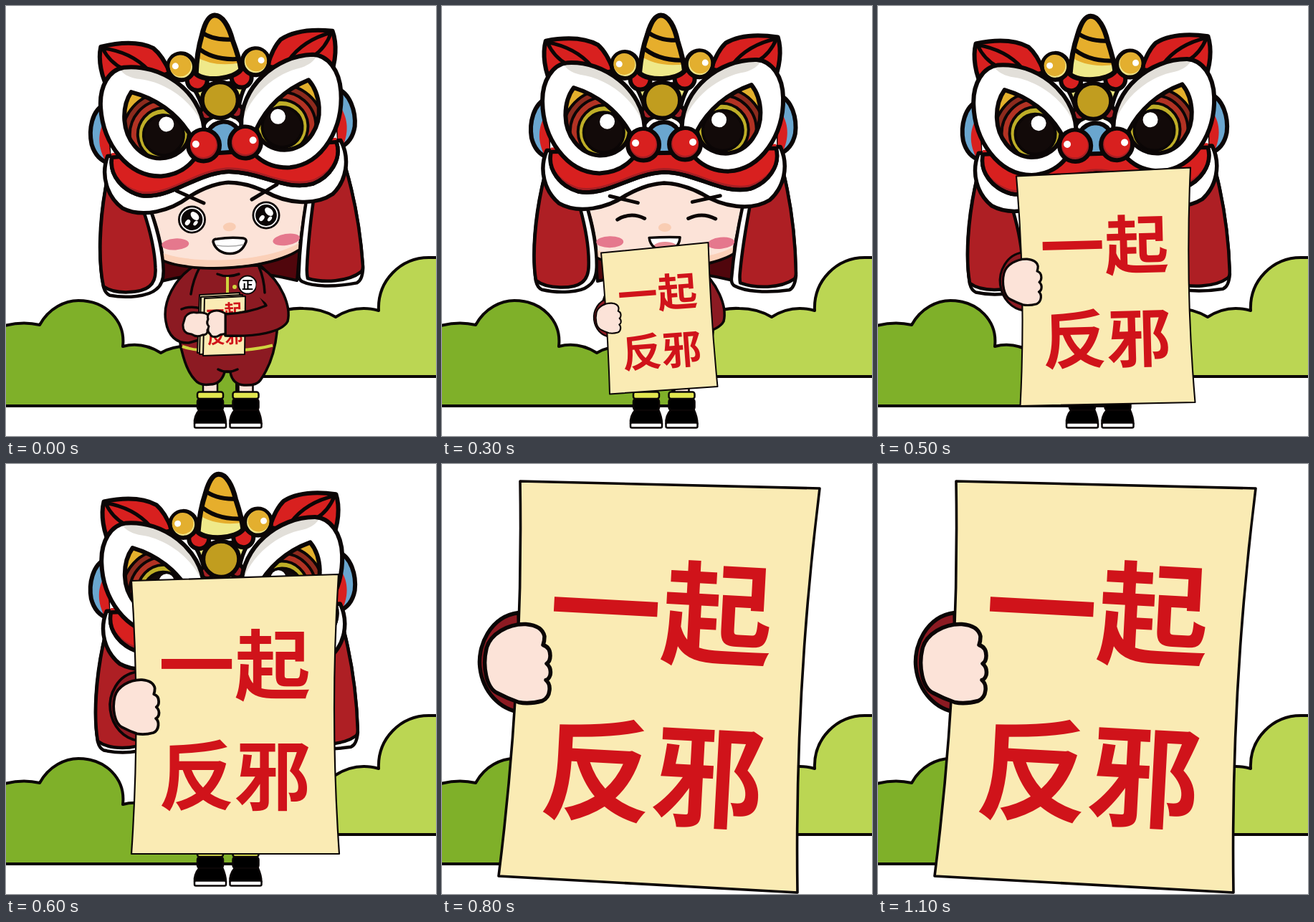
These frames come from a looping animation (600 by 600 pixels, 1300 ms). An HTML page:

```html
<!DOCTYPE html>
<html lang="zh">
<head>
<meta charset="utf-8">
<style>
html, body { margin: 0; width: 100%; height: 100%; overflow: hidden; background: #fff; }
svg { display: block; width: 100vw; height: 100vh; }
text { font-family: "Noto Sans CJK SC", "Noto Sans CJK", sans-serif; font-weight: 700; text-anchor: middle; }
</style>
</head>
<body>
<svg viewBox="0 0 600 600" stroke-linejoin="round" stroke-linecap="round">
  <defs>
    <clipPath id="socketClip"><path d="M191,111C225,122 252,145 268,174C266,195 245,207 225,206C195,203 179,175 179,150C179,133 184,120 191,111Z"/></clipPath>
    <clipPath id="smileClip"><path d="M293,322Q315,319 336,322C335,335 326,341 315,341C303,341 294,333 293,322Z"/></clipPath>
    <clipPath id="hornClip"><path id="horn" d="M314,12C325,12 333,28 337,48Q345,75 346,90C335,103 295,104 283,92Q286,62 295,38Q303,12 314,12Z"/></clipPath>
    <path id="band" d="M158,200C152,225 170,248 195,256C235,264 270,232 315,231C360,232 395,264 435,256C460,248 478,225 472,200Z"/>
    <g id="words" fill="#d0131a" font-size="100"><text y="-34.5">一起</text><text y="110.5">反邪</text></g>

    <g id="foot" stroke="#0b0606" stroke-width="2.5">
      <rect x="275" y="522" width="20" height="20" fill="#fce3d8"/>
      <path d="M270,563H302Q307,574 307,583H263Q262,572 270,563Z"/>
      <rect x="267" y="548" width="36" height="16" rx="4"/>
      <rect x="267" y="538.5" width="36" height="9.5" rx="3" fill="#e3e650"/>
      <rect x="263" y="581.5" width="44" height="7" rx="2" fill="#fff"/>
    </g>

    <g id="backHalf" stroke="#0b0606" stroke-width="6">
      <path fill="#6aa6cf" d="M154,125C134,132 128,160 131,180Q136,202 154,208Z"/>
      <path fill="#d8201f" stroke="none" d="M154,145C141,160 138,182 148,203L156,200Z"/>
      <path fill="#d8201f" d="M153,45Q200,37 226,52Q238,63 247,88L162,110C150,88 148,62 153,45Z"/>
      <path fill="none" stroke-width="5" d="M155,47Q164,68 182,78M155,47Q195,55 217,82"/>
    </g>

    <g id="frontHalf" stroke="#0b0606" stroke-width="6">
      <circle cx="284" cy="101" r="14" fill="#d8201f"/>
      <path fill="#fff" stroke="none" d="M183,76C235,74 287,115 289,168C286,205 262,230 225,231C178,229 147,180 147,130C147,100 162,78 183,76Z"/>
      <path fill="#e2dfd9" stroke="none" d="M177,77C235,70 288,115 289,168C275,125 235,98 200,93Q182,88 177,77Z"/>
      <path fill="none" d="M183,76C235,74 287,115 289,168C286,205 262,230 225,231C178,229 147,180 147,130C147,100 162,78 183,76Z"/>
      <g clip-path="url(#socketClip)" stroke-width="4">
        <rect x="175" y="105" width="100" height="110" fill="#e3b02c"/>
        <circle cx="233" cy="173" r="58" fill="#8c2a1d"/>
        <circle cx="233" cy="173" r="48" fill="#b23223"/>
        <circle cx="233" cy="173" r="37" fill="#beae27"/>
        <circle cx="232" cy="174" r="28" fill="#120a09"/>
      </g>
      <path fill="none" d="M191,111C225,122 252,145 268,174C266,195 245,207 225,206C195,203 179,175 179,150C179,133 184,120 191,111Z"/>
      <circle cx="237" cy="159" r="10.5" fill="#fff" stroke="none"/>
      <circle cx="263" cy="80.5" r="18.5" fill="#f0e68a"/>
      <circle cx="262" cy="79" r="15" fill="#e3af2f" stroke="none"/>
      <circle cx="255" cy="79" r="4.5" fill="#fff" stroke="none"/>
    </g>

    <g id="noseHalf">
      <circle cx="287" cy="192" r="22" fill="#a51f24" stroke="#0b0606" stroke-width="6"/>
      <circle cx="286.5" cy="190.5" r="18" fill="#d8201f"/>
      <circle cx="276" cy="189.5" r="5" fill="#fff"/>
    </g>

    <g id="openEye">
      <circle r="19.5" fill="#0b0606"/>
      <circle r="15.8" fill="none" stroke="#fff" stroke-width="1.8"/>
      <g fill="#fff">
        <ellipse cx="4" cy="-5" rx="4.5" ry="7" transform="rotate(-45 4 -5)"/>
        <ellipse cx="-6" cy="4" rx="3" ry="4.5" transform="rotate(40 -6 4)"/>
        <ellipse cx="5" cy="5" rx="2.3" ry="4" transform="rotate(40 5 5)"/>
      </g>
    </g>
  </defs>

  <g stroke="#0b0606" stroke-width="4">
    <path fill="#7fb029" d="M-5,447Q22,439 47,445C60,421 83,411 101,411C140,411 167,440 163,475Q190,468 216,484Q245,466 322,480V558H-5Z"/>
    <path fill="#bbd653" d="M350,517V450Q375,420 415,422Q440,422 460,434Q488,416 520,425C518,383 551,351 590,351H606V517Z"/>
  </g>

  <g id="hero">
    <use href="#foot"/>
    <use href="#foot" x="49.5"/>

    <path id="hood" fill="#50060c" stroke="#0b0606" stroke-width="4" d="M212,320L217,384Q315,360 406,383L411,325Z"/>

    <g stroke="#0b0606" stroke-width="3.5" fill="#8c1a22">
      <path d="M262,365C240,385 240,470 245,480Q252,510 264,522Q270,530 285,528Q300,528 305,511Q309,509 313,511Q316,528 332,529Q350,530 355,522Q374,495 378,455L380,400Q375,380 355,362Z"/>
      <path fill="none" d="M296,507Q309,514 323,507"/>
      <path fill="none" stroke="#cfd43f" stroke-width="4" stroke-linecap="butt" d="M246,475Q257,479 270,480M332,480Q355,478 372,473.500"/>
      <path d="M262,363C236,380 218,412 223,440C226,460 238,471 255,470L282,462L270,420L263,402Z" stroke="none"/>
      <path fill="none" d="M262,363C236,380 218,412 223,440C226,460 238,471 255,470L280,463M270,365Q261,382 258,402M245,423Q257,418 272,422"/>
      <path fill="none" d="M295,374Q309,380 325,374"/>
      <path fill="none" stroke="#cfd43f" stroke-width="4" stroke-linecap="butt" d="M309,378V400"/>
      <circle cx="319" cy="392" r="3" fill="#cfd43f" stroke="none"/>
      <circle cx="337" cy="389" r="12.5" fill="#fff" stroke-width="2"/>
    </g>
    <text x="337" y="395" font-size="16" style="font-weight:900">正</text>

    <g id="booklet" stroke="#0b0606" stroke-width="2" fill="#faebb4">
      <path d="M270,403L326,400L328,480L267,484Z"/>
      <path d="M272,406L330,403L332,483L270,486Z"/>
      <path d="M277,408L334,405L333,486L275,488Z"/>
      <use href="#words" stroke="none" transform="translate(305 443) rotate(-2) scale(.25)"/>
      <path fill="#fce3d8" stroke-width="3" d="M250,434Q255,426 266,428Q280,427 283,433Q286,439 283,443Q286,449 281,452Q282,459 274,459Q266,463 259,458Q246,457 247,444Z"/>
    </g>
    <path fill="#8c1a22" stroke="#0b0606" stroke-width="3.5" d="M357,365C385,385 398,420 393,440C385,455 350,462 306,460V430Q340,428 363,418L352,400Z"/>
    <path fill="#8c1a22" d="M352,364L361,371L365,416L348,402Z"/>
    <path fill="none" stroke="#0b0606" stroke-width="3.5" d="M353,364Q360,380 361,400"/>
    <path id="rightHand" fill="#fce3d8" stroke="#0b0606" stroke-width="3" d="M306,429Q295,422 286,427Q280,430 282,437Q279,443 283,447Q280,454 285,458Q287,463 295,461Q301,457 306,458Z"/>

    <g id="head">
      <g stroke="#0b0606" stroke-width="4.5">
        <path fill="#fce3d8" d="M207,278C214,300 219,330 219,348C255,368 365,373 410,346L425,278L315,240Z"/>
        <path fill="#fbd0b8" stroke="none" d="M220,338C265,358 365,360 410,337L409,345C365,370 258,367 220,347Z"/>
        <path fill="#fff" d="M148,235C133,290 129,345 134,380Q136,389 142,392C165,398 196,397 207,388Q218,381 219,362C220,335 215,308 207,278Z"/>
        <path fill="#ae1f24" d="M148,235C134,290 129,345 134,379C150,392 186,392 198,383Q208,376 208,358C209,330 204,305 197,278Z"/>
        <path fill="#fff" d="M482,235C492,280 497,330 497,378Q495,395 487,398C455,402 425,399 411,391Q406,388 407,380C410,350 417,310 425,276Z"/>
        <path fill="#ae1f24" d="M482,235C492,280 497,330 497,374Q497,381 494,383C475,396 440,395 419,387Q418,380 419,372C422,345 428,310 435,276Z"/>
      </g>
      <ellipse cx="315" cy="308" rx="9" ry="6" fill="#f9cdb3"/>
      <ellipse cx="238" cy="327" rx="19" ry="8" fill="#e5788d"/>
      <ellipse cx="393" cy="331" rx="19" ry="8" fill="#e5788d" transform="rotate(-5 393 331)"/>

      <use href="#backHalf"/>
      <use href="#backHalf" transform="translate(630) scale(-1 1)"/>
      <g stroke="#0b0606" stroke-width="5.500">
        <path fill="#fff" d="M152,198C140,225 148,255 168,272C195,288 235,280 262,262Q290,247 315,246Q340,247 368,262C395,280 435,288 462,272C482,255 490,225 478,198Z"/>
        <use href="#band" fill="#a51f24"/>
        <use href="#band" fill="#d8201f" stroke="none" transform="translate(0 -6)"/>
        <use href="#band" fill="none"/>
        <path fill="#ebe77f" d="M276,108H354Q338,130 336,168H294Q290,130 276,108Z"/>
        <circle cx="294" cy="148" r="9" fill="#a51f24"/>
        <circle cx="336" cy="148" r="9" fill="#a51f24"/>
        <path fill="#fff" stroke="none" d="M290,170Q292,155 315,155Q338,155 340,170Z"/>
      </g>
      <use href="#frontHalf"/>
      <use href="#frontHalf" transform="translate(630) scale(-1 1)"/>
      <g stroke="#0b0606" stroke-width="6">
        <circle cx="314" cy="130.500" r="25" fill="#c19d1f"/>
        <g clip-path="url(#hornClip)">
          <use href="#horn" fill="#efe98a" stroke="none"/>
          <path fill="#e6ae2c" stroke="none" d="M280,5H350V80Q308,86 282,66Z"/>
          <path fill="none" d="M293,33Q310,48 340,47M286,54Q308,76 347,75"/>
        </g>
        <use href="#horn" fill="none" stroke-width="7"/>
        <path fill="#6aa6cf" d="M288,204Q288,162 316,161Q342,162 342,204Z"/>
      </g>
      <use href="#noseHalf"/>
      <use href="#noseHalf" transform="translate(632) scale(-1 1)"/>

      <g id="grin" transform="rotate(3.9 317 355)">
        <use href="#openEye" transform="translate(259.500 298)"/>
        <use href="#openEye" transform="translate(363 292)"/>
        <path fill="none" stroke="#0b0606" stroke-width="5" d="M238,258L276,275M343,270L378,249"/>
        <path fill="#fff" stroke="#0b0606" stroke-width="3.5" d="M289,329Q289,325 295,325Q313,322 331,324Q336,325 335,329C330,342 322,345 313,345.500C302,346 292,340 289,329Z"/>
        <path fill="none" stroke="#aaa" stroke-width="1.500" d="M294,334Q313,337 331,333"/>
      </g>
      <g id="smile" fill="none" stroke="#0b0606" stroke-width="5">
        <path d="M249,296Q268,285 287,295M348,296Q367,287 386,297M239,263L278,273M354,273L393,265"/>
        <g clip-path="url(#smileClip)" stroke="none">
          <rect x="290" y="318" width="50" height="26" fill="#fff"/>
          <ellipse cx="315" cy="338" rx="19" ry="10" fill="#e98f97"/>
        </g>
        <path stroke-width="3.5" d="M293,322Q315,321 336,322C335,335 326,341 315,341C303,341 294,333 293,322Z"/>
      </g>
    </g>
  </g>

  <g id="sign">
    <g class="grip"><path fill="#8c1a22" stroke="#0b0606" stroke-width="5.500" transform="translate(-56 -240)" d="M105,225C65,230 47,272 51,302C55,335 78,360 108,364Z"/></g>
    <path id="sheet" fill="#faebb4" stroke="#0b0606"/>
    <use id="slogan" href="#words"/>
    <g class="grip"><path fill="#fce3d8" stroke="#0b0606" stroke-width="5.500" transform="translate(-56 -240)" d="M60,275C65,255 90,240 115,241Q138,243 141,258Q141,265 139,270Q149,273 149,285Q149,293 144,296Q151,302 149,312Q147,318 143,319Q149,324 148,333Q147,344 138,348Q120,353 105,350Q90,345 75,337C60,330 54,300 60,275Z"/></g>
  </g>
</svg>
<script>
const $ = id => document.getElementById(id);
const grips = document.querySelectorAll('.grip');

// sheet: corners clockwise from top left; words: x, y, size, angle; grip: x, y, scale; tilt: head angle and drop
const small = { sheet: [233, 377, 335, 363, 349, 500, 246, 511], words: [291, 440.5, 38, -5.5], grip: [230, 424, .285], tilt: [0, 0], look: [0, 2] };
const medium = { sheet: [211, 312, 408, 297, 420, 562, 222, 572], words: [316, 440, 73, -3], grip: [198, 404.5, .48], tilt: [-1.8, 2], look: [.045, 2] };
const large = { sheet: [175, 163, 464, 154, 465, 544, 175, 544], words: [319, 357, 106, 0], grip: [149, 300.5, .69], tilt: [-1.8, 2], look: [.045, 2.2] };
const swingLeft = { sheet: [82, 43, 500, 12, 525, 576, 107, 594], words: [304.5, 316, 156, -2.7], grip: [56, 240, 1], look: [.047, 3.6] };
const swingRight = { sheet: [109, 24, 527, 34, 496, 598, 79, 575], words: [300, 318, 156, 3.1], grip: [58, 222.5, 1], look: [.047, 3.6] };

function between(a, b) {
  const mid = {};
  for (const k in a) mid[k] = a[k].map((v, i) => (v + b[k][i]) / 2);
  return mid;
}

const steps = [
  [0, null], [200, small], [300, between(small, medium)], [400, medium],
  [500, between(medium, large)], [600, large], [700, swingLeft],
  [800, swingRight], [900, swingLeft], [1100, swingRight]
];

const show = (id, on) => $(id).setAttribute('display', on ? 'inline' : 'none');

function drawSign({ sheet, words, grip, look }) {
  const [ax, ay, bx, by, cx, cy, dx, dy] = sheet;
  const bend = look[0] * (bx - ax);
  $('sheet').setAttribute('d',
    `M${ax},${ay}L${bx},${by}Q${(bx + cx) / 2 - bend},${(by + cy) / 2} ${cx},${cy}` +
    `L${dx},${dy}Q${(ax + dx) / 2 + bend},${(ay + dy) / 2} ${ax},${ay}Z`);
  $('sheet').setAttribute('stroke-width', look[1]);
  const [x, y, size, angle] = words;
  $('slogan').setAttribute('transform', `translate(${x} ${y}) rotate(${angle}) scale(${size / 100})`);
  for (const g of grips) g.setAttribute('transform', `translate(${grip[0]} ${grip[1]}) scale(${grip[2]})`);
}

let current;
function render(ms) {
  const t = ms % 1300;
  const pose = steps.filter(s => s[0] <= t).pop()[1];
  if (pose === current) return;
  current = pose;
  const resting = !pose;
  for (const id of ['booklet', 'rightHand', 'grin']) show(id, resting);
  for (const id of ['sign', 'smile']) show(id, !resting);
  show('hero', resting || pose.tilt);
  if (resting) {
    $('head').setAttribute('transform', 'rotate(-3.9 317 355)');
  } else {
    if (pose.tilt) $('head').setAttribute('transform', `translate(0 ${pose.tilt[1]}) rotate(${pose.tilt[0]} 315 570)`);
    drawSign(pose);
  }
}

const start = performance.now();
function tick() {
  render(performance.now() - start);
  requestAnimationFrame(tick);
}
tick();
</script>
</body>
</html>
```
